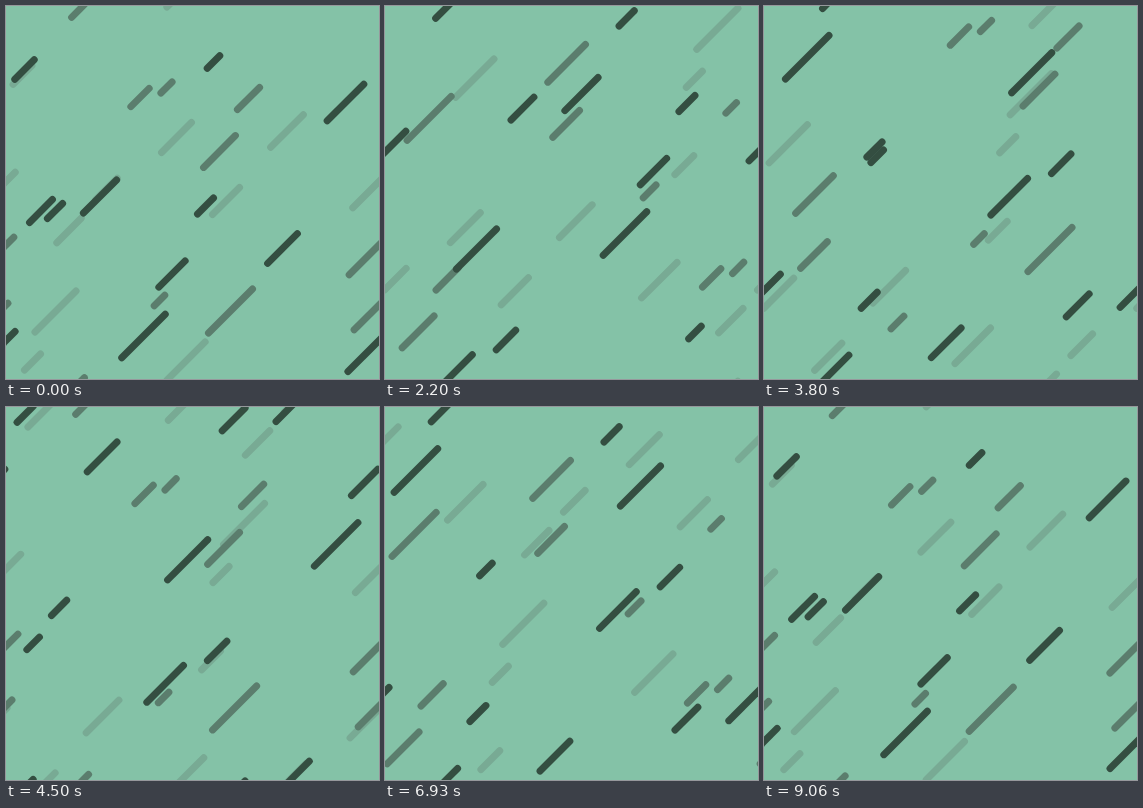
Animation of 373 by 373 pixels, one loop 9.09 s. Source, as an HTML page:

```html
<!DOCTYPE html>
<html lang="en">
<head>
<meta charset="utf-8">
<title>Diagonal rain</title>
<style>
  /* Animating a number instead of the transform repaints the strokes sharply at every step. */
  @property --loop { syntax: "<number>"; inherits: true; initial-value: 0; }
  html, body { margin: 0; width: 100%; height: 100%; overflow: hidden; background: #84c2a7; }
  svg { display: block; width: 100%; height: 100%; animation: fall 9090ms steps(273) -5ms infinite; }
  path { fill: none; stroke-width: 7; stroke-linecap: round; }
  .light { stroke: #78aa94; }
  .mid { stroke: #5b7d6d; }
  .dark { stroke: #344e41; }
  .layer {
    --shift: calc(var(--loop) * var(--tiles) * 373px);
    transform: translate(calc(-1 * var(--shift)), var(--shift));
  }
  @keyframes fall { to { --loop: 1; } }
</style>
</head>
<body>
<svg viewBox="0 0 373 373"></svg>
<script>
const SIZE = 373;

// Centres run from the shortest drop to the longest; nearer layers cross more tiles per loop.
const layers = [
  { tone: "light", tiles: 1, shortest: 16, longest: 41, curve: 1, centres: [
    [26.5, 356], [16.5, 69], [100.5, 183], [63, 224.5], [220, 195],
    [170.5, 131.5], [281, 125], [364.5, 184], [180, 355], [49.5, 305.5]] },
  { tone: "mid", tiles: 2, shortest: 10.5, longest: 44, curve: 1.8, darkDrop: 3, centres: [
    [153.5, 294.5], [160.5, 81.5], [72, 5], [49, 205], [134, 91.5],
    [242.5, 92.5], [361.5, 310.5], [213.5, 145.5], [362, 250], [224.5, 305]] },
  { tone: "dark", tiles: 3, shortest: 12.5, longest: 43.5, curve: 1, centres: [
    [207.5, 56], [199.5, 200], [18.5, 63.5], [35, 205], [166, 268],
    [276.5, 242.5], [94, 190.5], [339.5, 96.5], [362, 345.5], [137.5, 330]] }
];

const svg = document.querySelector("svg");

function add(parent, tag, attrs) {
  const el = document.createElementNS(svg.namespaceURI, tag);
  for (const key in attrs) el.setAttribute(key, attrs[key]);
  return parent.appendChild(el);
}

function addDrop(tile, tone, [x, y], run) {
  const d = `M${x - run / 2} ${y + run / 2}l${run} ${-run}`;
  add(tile, "path", { class: tone, d });
}

const defs = add(svg, "defs", {});

for (const { tone, tiles, shortest, longest, curve, darkDrop, centres } of layers) {
  const tile = add(defs, "g", { id: tone });
  centres.forEach((centre, i) => {
    const rank = i / (centres.length - 1);
    const run = shortest + (longest - shortest) * rank ** curve;
    addDrop(tile, i === darkDrop ? "dark" : tone, centre, run);
  });

  // Repeat the tile along the diagonal band that passes through the stage.
  const layer = add(svg, "g", { class: "layer", style: `--tiles: ${tiles}` });
  for (let col = -1; col <= tiles + 1; col++) {
    for (let row = -tiles - 1; row <= 1; row++) {
      if (Math.abs(col + row) > 2) continue;
      add(layer, "use", { href: "#" + tone, x: col * SIZE, y: row * SIZE });
    }
  }
}
</script>
</body>
</html>
```
